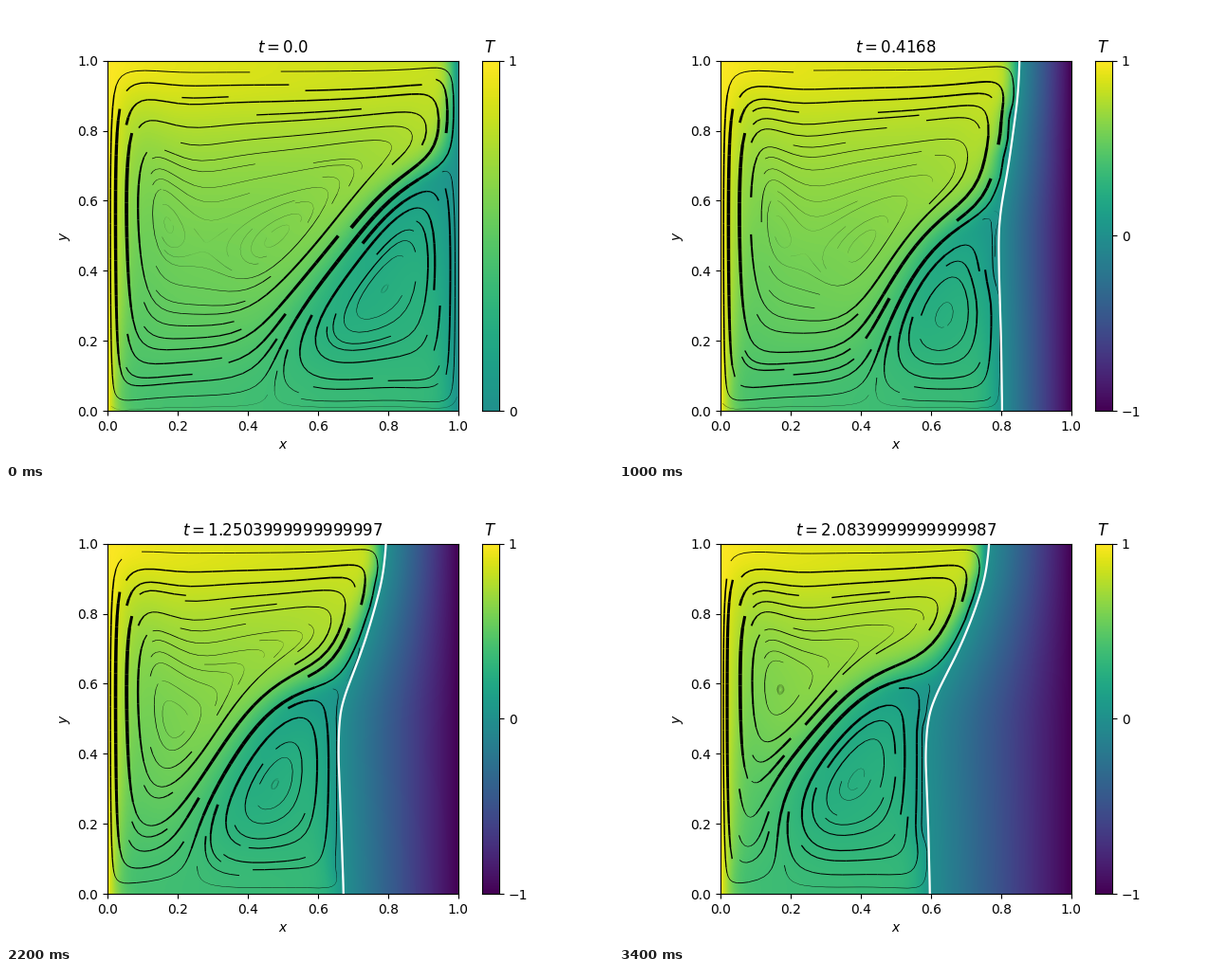
A matplotlib script for the animation above (3.5 s loop, 640 px wide and 480 px high).

```python
"""Water freezing in a square cavity: convection cells, ice front and temperature."""
from math import hypot, sqrt

import matplotlib.pyplot as plt
import numpy as np
from matplotlib.animation import FuncAnimation
from matplotlib.collections import LineCollection

# Physics, in units of cavity height and viscous time
RA, PR = 2.518084e6, 11.57
KAPPA = 1 / PR
GAIN = RA / PR * 9.29717e-6 / 6.91e-4
T_DENSE, POWER = 4.0293, 1.894816

# Discretisation
N = 64
SHOTS, SUB, SPIN = 30, 150, 2800
SHOT_DT = 521 / 7500
DT = SHOT_DT / SUB
SOLID, VMAX = 200, 80
TIMES = [0.0] + np.cumsum(np.full(SHOTS, SHOT_DT)).tolist()

xf = np.linspace(0, 1, N + 1)
xc = (xf[1:] + xf[:-1]) / 2

# Ice front x(y) at a few times; it advances like the square root of time
FRONT_Y = [0, .2, .4, .5, .55, .6, .7, .8, .9, 1]
FRONT_ROOT = np.sqrt([0, .0695, .4168, .6947, 1.2504, 1.7367, 2.084])
FRONT = np.array([
    [1] * 10,
    [.928, .928, .926, .925, .925, .926, .932, .936, .937, .938],
    [.803, .800, .794, .793, .796, .803, .821, .835, .848, .853],
    [.749, .743, .736, .735, .741, .753, .776, .800, .820, .826],
    [.673, .666, .658, .661, .670, .689, .727, .758, .784, .795],
    [.626, .619, .611, .618, .631, .651, .699, .735, .764, .777],
    [.597, .592, .584, .591, .606, .630, .681, .722, .754, .767],
])


def front(t, y):
    cols = [np.interp(sqrt(t), FRONT_ROOT, c) for c in FRONT.T]
    fine = np.linspace(0, 1, 101)
    raw = np.pad(np.interp(fine, FRONT_Y, cols), 4, mode='edge')
    return np.interp(y, fine, np.convolve(raw, np.ones(9) / 9, 'valid'))


def laplacian(n, corner):
    """1D Laplacian with a given boundary entry, and its eigenpairs."""
    a = np.eye(n, k=1) + np.eye(n, k=-1) - 2 * np.eye(n)
    a[0, 0] = a[-1, -1] = corner
    a *= N * N
    return (a, *np.linalg.eigh(a))


def solver(ey, ex, a, b):
    """Inverse of (a - b * Laplacian)."""
    (_, ly, qy), (_, lx, qx) = ey, ex
    den = a - b * (ly[:, None] + lx)
    den[abs(den) < 1e-6] = np.inf
    qyt, qxt = qy.T.copy(), qx.T.copy()
    return lambda r: qy @ ((qyt @ r @ qx) / den) @ qxt


def mover(ey, ex):
    """Viscous time step for a velocity component that must rest in the ice."""
    ay, ax, solve = ey[0], ex[0], solver(ey, ex, 1, DT)

    def step(f, force, k):
        gain = solve(DT * (force + ay @ f + f @ ax) / k)
        return np.clip((f + gain) / k, -VMAX, VMAX)
    return step


def dx(a):
    return a[:, 1:] - a[:, :-1]


def dy(a):
    return a[1:] - a[:-1]


def mx(a):
    return (a[:, 1:] + a[:, :-1]) / 2


def my(a):
    return (a[1:] + a[:-1]) / 2


def drag(t):
    """Damping factors for T, u and v: 1 in water, large in ice."""
    def factor(y, x):
        return 1 + SOLID * np.clip((x - front(t, y)[:, None]) * N + .5, 0, 1)
    return factor(xc, xc), factor(xc, xf[1:-1]), factor(xf[1:-1], xc)


def first_guess():
    x, y = np.meshgrid(xc, xc)
    cold = 1 / (1 + np.exp(-(x - .45 - .75 * y) / .05))
    T = (.42 + .43 * y**2) * (1 - cold) + .25 * cold
    T += (1 - T) * np.exp(-x / .03)
    return T * (1 - np.exp((x - 1) / .03))


def simulate():
    """Projection method on a staggered grid; returns (T, U, V) per shot."""
    half, full, free = laplacian(N, -3), laplacian(N - 1, -2), laplacian(N, -1)
    solve_T = solver(free, half, 1, DT * KAPPA)
    solve_p = solver(free, free, 0, -1)
    move_u, move_v = mover(half, full), mover(full, half)

    T, p = first_guess(), np.zeros((N, N))
    u, fx = np.zeros((N, N + 1)), np.zeros((N, N + 1))
    v, fy = np.zeros((N + 1, N)), np.zeros((N + 1, N))
    uk, vk = np.zeros((N + 1, N + 1)), np.zeros((N + 1, N + 1))
    old, shots = None, []
    for n in range(-SPIN, SHOTS * SUB + 1):
        if n % 10 == 0:
            kT, ku, kv = drag(max(n, 0) * DT)
        uk[1:-1], vk[:, 1:-1] = my(u), mx(v)
        if n >= 0 and n % SUB == 0:
            water = xf < front(n * DT, xf)[:, None]
            shots.append((T, uk * water, vk * water))

        # Advection, extrapolated in time
        uc, vc, uv = mx(u), my(v), uk * vk
        fx[:, 1:-1] = u[:, 1:-1] * mx(T)
        fy[1:-1] = v[1:-1] * my(T)
        new = ((dx(uc * uc) + dy(uv)[:, 1:-1]) * N,
               (dy(vc * vc) + dx(uv)[1:-1]) * N,
               (dx(fx) + dy(fy)) * N)
        au, av, aT = [1.5 * g - .5 * o for g, o in zip(new, old or new)]
        old = new

        r = T - DT * aT
        r[:, 0] += 2 * KAPPA * DT * N * N
        T = np.clip(solve_T(r), 0, 1) / kT

        lift = GAIN * abs(10 * T - T_DENSE)**POWER
        u[:, 1:-1] = move_u(u[:, 1:-1], -au - dx(p) * N, ku)
        v[1:-1] = move_v(v[1:-1], my(lift) - av - dy(p) * N, kv)

        phi = solve_p((dx(u) + dy(v)) * (N / DT))
        u[:, 1:-1] -= DT * N * dx(phi)
        v[1:-1] -= DT * N * dy(phi)
        p += phi
    return shots


# Evenly spaced streamlines on a coarse occupancy grid
CELLS = 30
STEP, TOL, MAX_LEN, MIN_LEN = 1 / CELLS, .003, 2, .1
WIDTH = 3


def spiral(n):
    """Cells of an n x n grid from the rim inwards."""
    lo, hi = 0, n - 1
    while lo <= hi:
        yield from ((x, lo) for x in range(lo, hi + 1))
        yield from ((hi, y) for y in range(lo + 1, hi + 1))
        yield from ((x, hi) for x in range(hi - 1, lo - 1, -1))
        yield from ((lo, y) for y in range(hi - 1, lo, -1))
        lo, hi = lo + 1, hi - 1


def inside(x, y):
    return 0 <= x <= 1 and 0 <= y <= 1


def cell(x, y):
    return int(x * (CELLS - 1) + .5), int(y * (CELLS - 1) + .5)


def streamlines(U, V):
    """Segments and their widths, which follow the local speed."""
    top = np.hypot(U, V).max()
    U, V = (U / top).tolist(), (V / top).tolist()
    taken = set()

    def velocity(x, y):
        gx, gy = x * N, y * N
        i, j = min(int(gx), N - 1), min(int(gy), N - 1)
        a, b = gx - i, gy - j
        w00, w10, w01, w11 = (1 - a) * (1 - b), a * (1 - b), (1 - a) * b, a * b
        p, q, r, s = U[j], U[j + 1], V[j], V[j + 1]
        u = w00 * p[i] + w10 * p[i + 1] + w01 * q[i] + w11 * q[i + 1]
        v = w00 * r[i] + w10 * r[i + 1] + w01 * s[i] + w11 * s[i + 1]
        return u, v, hypot(u, v)

    def trace(x, y, sign, mine):
        pts, length, ds, here = [], 0, STEP, cell(x, y)
        while True:
            u, v, s = velocity(x, y)
            if s < 1e-6:
                break
            ax, ay = sign * u / s, sign * v / s
            xm, ym = x + ds * ax, y + ds * ay
            if not inside(xm, ym):
                break
            u, v, s = velocity(xm, ym)
            if s < 1e-6:
                break
            bx, by = sign * u / s, sign * v / s
            err = ds / 2 * hypot(bx - ax, by - ay)
            if err < TOL:
                x += ds * (ax + bx) / 2
                y += ds * (ay + by) / 2
                if not inside(x, y):
                    break
                c = cell(x, y)
                if c != here:
                    if c in taken:
                        break
                    taken.add(c)
                    mine.append(c)
                    here = c
                if length + ds > MAX_LEN:
                    break
                length += ds
                pts.append((x, y))
            ds = min(STEP, .85 * ds * sqrt(TOL / err)) if err else STEP
        return pts, length

    segs, widths = [], []
    for c in spiral(CELLS):
        if c in taken:
            continue
        x, y = c[0] / (CELLS - 1), c[1] / (CELLS - 1)
        mine = [c]
        taken.add(c)
        back, len_b = trace(x, y, -1, mine)
        ahead, len_a = trace(x, y, 1, mine)
        if len_a + len_b <= MIN_LEN:
            taken.difference_update(mine)
            continue
        line = back[::-1] + [(x, y)] + ahead
        segs += zip(line[:-1], line[1:])
        widths += [WIDTH * velocity(*q)[2] for q in line[:-1]]
    return segs, widths


# Temperature picture: bilinear samples of the water plus a linear ice profile
PIX = 185
px = (np.arange(PIX) + .5) / PIX
knots = np.r_[0, xc, 1]
W = np.array([np.interp(px, knots, e) for e in np.eye(N + 2)]).T


def picture(T, t):
    P = np.pad(T, 1, mode='edge')
    P[:, 0], P[:, -1] = 1, 0
    X = front(t, px)[:, None]
    ice = np.minimum(0, (X - px) / np.maximum(1 - X, 1e-9))
    return W @ P @ W.T + ice


scenes = [(picture(T, t), *streamlines(U, V))
          for t, (T, U, V) in zip(TIMES, simulate())]

fig = plt.figure(figsize=(6.4, 4.8), dpi=100)
ax = fig.add_axes([.1675, .11, .5775, .77])
img = ax.imshow(scenes[0][0], extent=(0, 1, 0, 1), origin='lower', cmap='viridis',
                vmin=-1, vmax=1, interpolation='bilinear', aspect='auto')
flow = ax.add_collection(LineCollection([], colors='k', zorder=2))
ice_line, = ax.plot([], [], color='w', lw=1.6, zorder=3)
ax.set(xlim=(0, 1), ylim=(0, 1), xlabel='$x$', ylabel='$y$')
title = ax.set_title('')

bar = fig.add_axes([.78375, .11, .028875, .77])
bar.imshow(np.linspace(-1, 1, 256)[:, None], extent=(0, 1, -1, 1), origin='lower',
           cmap='viridis', vmin=-1, vmax=1, aspect='auto')
bar.set_xticks([])
bar.set_yticks([-1, 0, 1])
bar.yaxis.tick_right()
bar.set_title('$T$')

HOLD = 5
edge_y = np.linspace(0, 1, 101)


def update(k):
    i = max(0, k - HOLD + 1)
    field, segs, widths = scenes[i]
    img.set_data(field)
    flow.set_segments(segs)
    flow.set_linewidths(widths)
    ice_line.set_data(front(TIMES[i], edge_y), edge_y)
    ice_line.set_visible(i > 0)
    title.set_text(f'$t = {TIMES[i]}$')
    bar.set_ylim(-1 if i else 0, 1)
    return img, flow, ice_line, title


anim = FuncAnimation(fig, update, frames=SHOTS + HOLD, interval=100,
                     repeat=True, repeat_delay=0)
plt.show()
```
